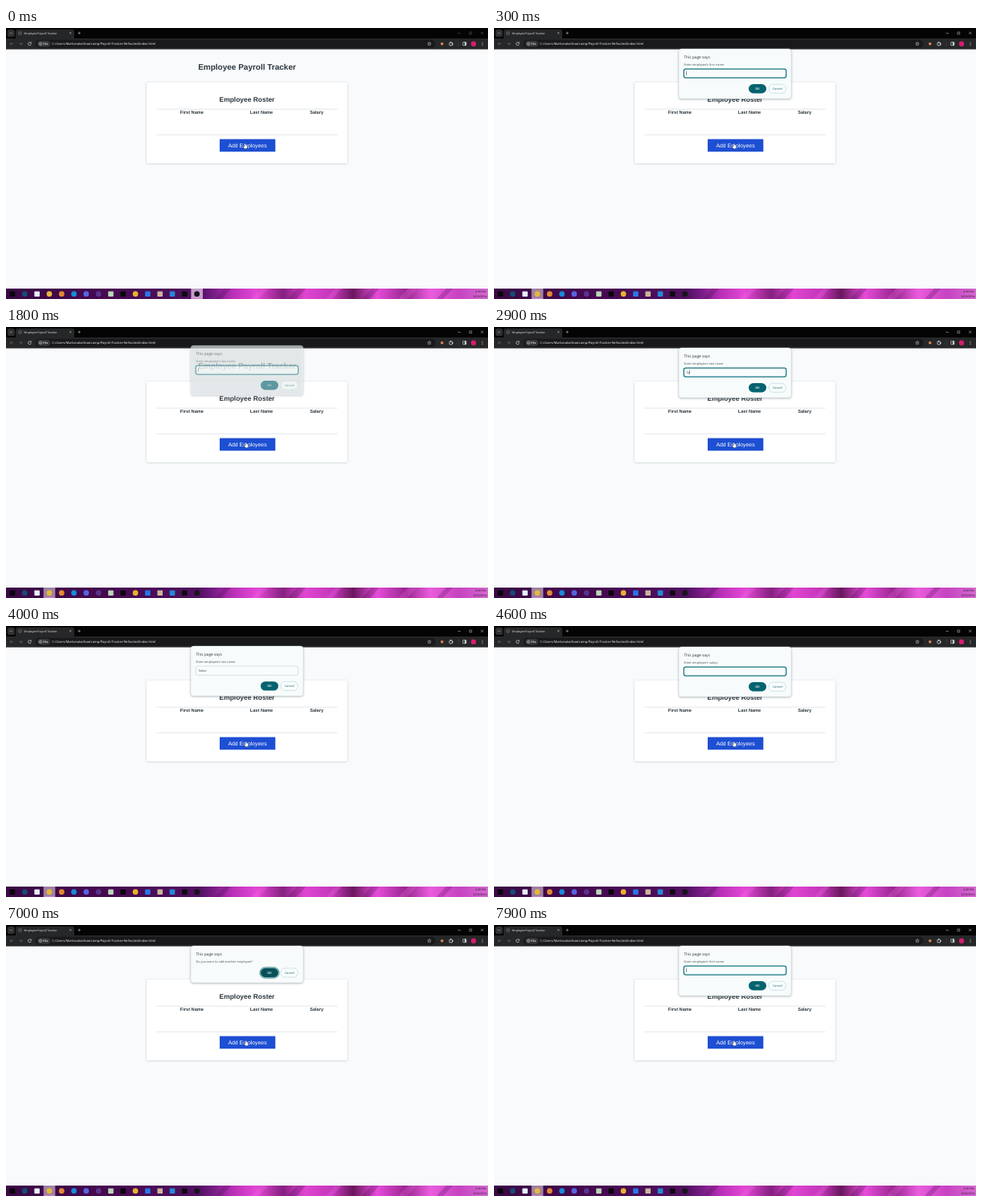
These frames come from a looping animation (600x338 px, 8000 ms). An HTML page with a canvas:

```html
<!DOCTYPE html>
<html lang="en">
<head>
<meta charset="utf-8">
<title>Employee Payroll Tracker</title>
<style>
html, body { margin: 0; width: 100%; height: 100%; overflow: hidden; background: #f8fafb; }
canvas { display: block; width: 100vw; height: 100vh; }
</style>
</head>
<body>
<canvas id="stage"></canvas>
<script>
const W = 600, H = 338, LOOP = 8000;
const canvas = document.getElementById('stage');
const ctx = canvas.getContext('2d');
const ARIAL = '"Liberation Sans", Arial, sans-serif';
const UI = '"Open Sans", "Noto Sans", sans-serif';
const TEAL = '#03636f';

// Each dialog opens at `at`, starts closing at `end`; `keys` are keystroke times.
const dialogs = [
  { at: 200, end: 1700, msg: "Enter employee's first name", word: 'Sid', keys: [800, 1000, 1200] },
  { at: 1800, end: 4000, msg: "Enter employee's last name", word: 'Talbot', keys: [2700, 2900, 3100, 3200, 3300, 3500] },
  { at: 4100, end: 6800, msg: "Enter employee's salary", word: '60000', keys: [5800, 6000, 6200, 6300, 6400] },
  { at: 6900, end: 7700, msg: 'Do you want to add another employee?', confirm: true },
  { at: 7800, end: 9000, msg: "Enter employee's first name", word: '', keys: [] }
];
const caretOff = [[600, 700], [2300, 2600], [4600, 5100], [5600, 5800]];

function rect(x, y, w, h, fill) {
  ctx.fillStyle = fill;
  ctx.fillRect(x, y, w, h);
}

function box(x, y, w, h, r, fill, stroke, lw = 0.6) {
  ctx.beginPath();
  ctx.roundRect(x, y, w, h, r);
  if (fill) { ctx.fillStyle = fill; ctx.fill(); }
  if (stroke) { ctx.strokeStyle = stroke; ctx.lineWidth = lw; ctx.stroke(); }
}

function dot(x, y, r, fill, stroke) {
  ctx.beginPath();
  ctx.arc(x, y, r, 0, 7);
  if (fill) { ctx.fillStyle = fill; ctx.fill(); }
  if (stroke) { ctx.strokeStyle = stroke; ctx.lineWidth = 0.6; ctx.stroke(); }
}

function path(points, color, lw = 0.6) {
  ctx.beginPath();
  for (let i = 0; i < points.length; i += 2) ctx.lineTo(points[i], points[i + 1]);
  ctx.strokeStyle = color;
  ctx.lineWidth = lw;
  ctx.stroke();
}

function text(str, x, y, size, color, family = UI, weight = 400, align = 'left') {
  ctx.font = `${weight} ${size}px ${family}`;
  ctx.textAlign = align;
  ctx.fillStyle = color;
  ctx.fillText(str, x, y);
}

function withShadow(color, blur, dy, draw) {
  ctx.save();
  const k = canvas.width / W;
  ctx.shadowColor = color;
  ctx.shadowBlur = blur * k;
  ctx.shadowOffsetY = dy * k;
  draw();
  ctx.restore();
}

function cross(x, y, r, color) {
  path([x - r, y - r, x + r, y + r], color, 0.5);
  path([x - r, y + r, x + r, y - r], color, 0.5);
}

function drawBrowser(active) {
  const ink = '#d8dadc', dim = '#77797c', ctl = active ? '#e4e4e4' : '#707070';
  rect(0, 0, W, 13, '#040405');
  box(1.8, 2, 9, 9, 2.6, '#303133');
  path([5, 5.8, 6.3, 7.1, 7.6, 5.8], ink);
  box(12, 1.8, 73, 14, 3, '#262728');
  dot(17.5, 6.5, 1.9, null, '#85888b');
  path([16.2, 7.8, 18.8, 5.2], '#85888b', 0.5);
  text('Employee Payroll Tracker', 22.4, 7.7, 3.52, '#f4f4f4', UI, 500);
  cross(80.2, 6.3, 1.1, ink);
  path([89.5, 6.3, 92.9, 6.3], ink, 0.5);
  path([91.2, 4.6, 91.2, 8], ink, 0.5);
  path([562.6, 6.5, 565.8, 6.5], ctl, 0.5);
  box(576.9, 5, 2.8, 2.8, 0.3, null, ctl, 0.5);
  cross(592.7, 6.3, 1.5, ctl);

  rect(0, 13, W, 13.6, '#262728');
  box(36.5, 14.7, 498, 10, 5, '#19191b');
  path([9, 19.7, 5.2, 19.7], dim);
  path([7, 17.9, 5.2, 19.7, 7, 21.5], dim);
  path([16.4, 19.7, 20.2, 19.7], dim);
  path([18.4, 17.9, 20.2, 19.7, 18.4, 21.5], dim);
  ctx.beginPath();
  ctx.arc(29.5, 19.7, 1.9, 0.3, 5.5);
  ctx.strokeStyle = ink;
  ctx.lineWidth = 0.7;
  ctx.stroke();
  path([31.4, 17.6, 31.4, 19.1, 29.9, 19.1], ink);
  box(39, 16, 16, 7.4, 3.7, '#37383b');
  dot(43, 19.7, 1.6, null, ink);
  path([43, 19.3, 43, 20.8], ink, 0.5);
  text('File', 46.3, 21, 3.6, '#eee', UI, 600);
  text('C:/Users/Marbrooke/bootcamp/Payroll-Tracker-Refracted/index.html', 57.3, 21.1, 4.05, '#f6f6f6', UI, 500);

  ctx.beginPath();
  for (let i = 0; i < 10; i++) {
    const a = i * Math.PI / 5 - Math.PI / 2, r = i % 2 ? 1 : 2.3;
    ctx.lineTo(527 + r * Math.cos(a), 19.8 + r * Math.sin(a));
  }
  ctx.closePath();
  ctx.strokeStyle = ink;
  ctx.lineWidth = 0.5;
  ctx.stroke();
  dot(542.8, 19.7, 1.8, '#dd835d');
  box(552, 18.2, 3.6, 3.6, 0.5, null, ink, 0.8);
  dot(553.8, 17.7, 0.8, ink);
  dot(556, 20, 0.8, ink);
  path([563.2, 16.5, 563.2, 23], '#515254', 0.4);
  box(568.8, 17.7, 4, 4, 0.4, null, ink, 0.7);
  rect(571, 17.7, 1.8, 4, ink);
  dot(582, 19.7, 3.2, '#d51c70');
  for (let i = -1; i < 2; i++) dot(593, 19.7 + i * 1.7, 0.5, ink);
}

function drawPage() {
  const ink = '#2b363d';
  rect(0, 26, W, 299, '#f8fafb');
  text('Employee Payroll Tracker', 300, 52.2, 10, ink, ARIAL, 700, 'center');
  withShadow('rgba(40,65,80,.26)', 2.5, 0.5, () => box(175, 68, 250, 100.7, 1.2, '#fff'));
  text('Employee Roster', 300, 91.7, 8.44, ink, ARIAL, 700, 'center');
  rect(187.5, 100.8, 225, 0.6, '#ccd6df');
  rect(187.5, 132.8, 225, 0.6, '#ccd6df');
  [['First Name', 231.4], ['Last Name', 318], ['Salary', 386.6]].forEach(([s, x]) =>
    text(s, x, 107, 5.63, ink, ARIAL, 700, 'center'));
  rect(266, 138.6, 69.3, 15.7, '#1d4fd3');
  text('Add Employees', 300.5, 148.7, 6.88, '#fff', ARIAL, 400, 'center');
}

function drawHand(x, y) {
  ctx.save();
  ctx.translate(x, y);
  ctx.beginPath();
  [-0.8, -3, 0.2, -3, 0.3, -1.2, 2.4, -0.5, 2.3, 1.7, 1.5, 3.4, -0.8, 3.4, -2.5, 0.8, -1.9, 0.3, -0.8, 1]
    .forEach((v, i, p) => { if (i % 2) ctx.lineTo(p[i - 1], v); });
  ctx.closePath();
  ctx.lineJoin = 'round';
  ctx.lineWidth = 0.9;
  ctx.strokeStyle = '#10204c';
  ctx.stroke();
  ctx.fillStyle = '#fff';
  ctx.fill();
  ctx.restore();
}

function drawTaskbar(active) {
  const g = ctx.createLinearGradient(0, 0, W, 0);
  [[0, '#3a0945'], [0.2, '#45094f'], [0.4, '#501060'], [0.43, '#761c84'], [0.47, '#b830b6'],
   [0.52, '#e447d6'], [0.575, '#85207f'], [0.62, '#e045d2'], [0.68, '#c236b8'], [0.72, '#6a175e'],
   [0.77, '#e64cda'], [0.83, '#98268f'], [0.88, '#ea5cdd'], [0.94, '#c643c1'], [1, '#d669d1']]
    .forEach(([p, c]) => g.addColorStop(p, c));
  rect(0, 325, W, 13, g);
  // Broad, soft streaks over the bright half.
  ctx.save();
  ctx.beginPath();
  ctx.rect(250, 325, 330, 13);
  ctx.clip();
  for (let i = 0; i < 7; i++) {
    const x = 262 + i * 46;
    path([x, 340, x + 16, 323], i % 2 ? 'rgba(250,120,238,.22)' : 'rgba(70,10,80,.25)', 6 + i % 3);
  }
  ctx.restore();

  const focus = active ? 54 : 237.7;
  rect(focus - 7.3, 325, 14.6, 13, active ? 'rgba(200,180,200,.7)' : 'rgba(226,194,228,.8)');
  rect(focus - 7, 337.1, 14, 0.9, '#d67fd3');
  const icons = ['#08070a', '#174a73', '#e8effb', '#e5b83b', '#e38a32', '#168bd8', '#5865e0', '#59338c',
    '#b9d6b6', '#08080a', '#e9b32c', '#2878e8', '#c9b69a', '#2589d6', '#0b0b0d', '#17151a'];
  icons.forEach((c, i) => {
    const x = 8 + i * 15.31;
    if ([0, 2, 8, 9, 11, 12, 13, 14].includes(i)) box(x - 3.3, 328.4, 6.6, 6.6, 0.8, c);
    else dot(x, 331.7, 3.4, c);
  });
  text('2:39 PM', 597.5, 330, 3.6, '#17101b', UI, 500, 'right');
  text('2/22/2024', 598.5, 335.8, 3.6, '#17101b', UI, 500, 'right');
}

function drawDialog(d, t) {
  const closing = t >= d.end;
  const opening = t < d.at + 100;
  const h = d.confirm ? 46 : 62.2;
  const cy = d.confirm ? 59.5 : 75.8;
  const fill = '#f7fbfb';
  ctx.save();
  ctx.globalAlpha = opening ? 0.6 : 1;
  ctx.translate(0, opening ? -3 : closing ? -0.9 : 0);
  withShadow('rgba(20,45,55,.38)', 3, 0.8, () => box(230, 26, 140, h, 3.5, fill));
  box(230, 26, 140, h, 3.5, null, '#c9d6d8', 0.4);
  text('This page says', 236.4, 38, 4.84, '#243033', UI, 500);
  text(d.msg, 236.4, 46.8, 3.84, '#465357');

  if (!d.confirm) {
    const value = d.word.slice(0, d.keys.filter(k => t >= k).length);
    box(236.3, 51, 127.4, 11.2, 2.4, '#f9fcfc', closing ? '#c3cfd2' : '#147581', closing ? 0.6 : 1.25);
    text(value, 239.3, 57.9, 3.6, '#33434a');
    const hidden = closing || caretOff.some(([a, b]) => t >= a && t < b);
    if (!hidden) rect(239.5 + ctx.measureText(value).width, 53.8, 0.5, 5.2, '#17282e');
  }

  if (d.confirm) box(316, cy - 6.6, 24, 13.2, 6.6, fill, TEAL, 0.8);
  box(317, cy - 5.7, 22, 11.4, 5.7, d.confirm ? '#07505a' : TEAL);
  text('OK', 328, cy + 1.35, 3.8, '#fff', UI, 600, 'center');
  box(342, cy - 5.6, 21.5, 11.2, 5.6, '#f9fcfc', '#a7d1d3', 0.55);
  text('Cancel', 352.8, cy + 1.3, 3.8, '#0c6771', UI, 500, 'center');
  ctx.restore();
}

function draw(t) {
  const active = t >= 200;
  drawPage();
  drawHand(active ? 299 : 297.8, 147.2);
  drawBrowser(active);
  drawTaskbar(active);
  const d = dialogs.find(q => t >= q.at && t < q.end + 100);
  if (d) drawDialog(d, t);
}

function resize() {
  const dpr = window.devicePixelRatio || 1;
  canvas.width = Math.round(innerWidth * dpr);
  canvas.height = Math.round(innerHeight * dpr);
}

const start = performance.now();
function frame() {
  ctx.setTransform(canvas.width / W, 0, 0, canvas.height / H, 0, 0);
  ctx.textRendering = 'geometricPrecision';
  draw((performance.now() - start) % LOOP);
  requestAnimationFrame(frame);
}

addEventListener('resize', resize);
resize();
frame();
</script>
</body>
</html>
```
